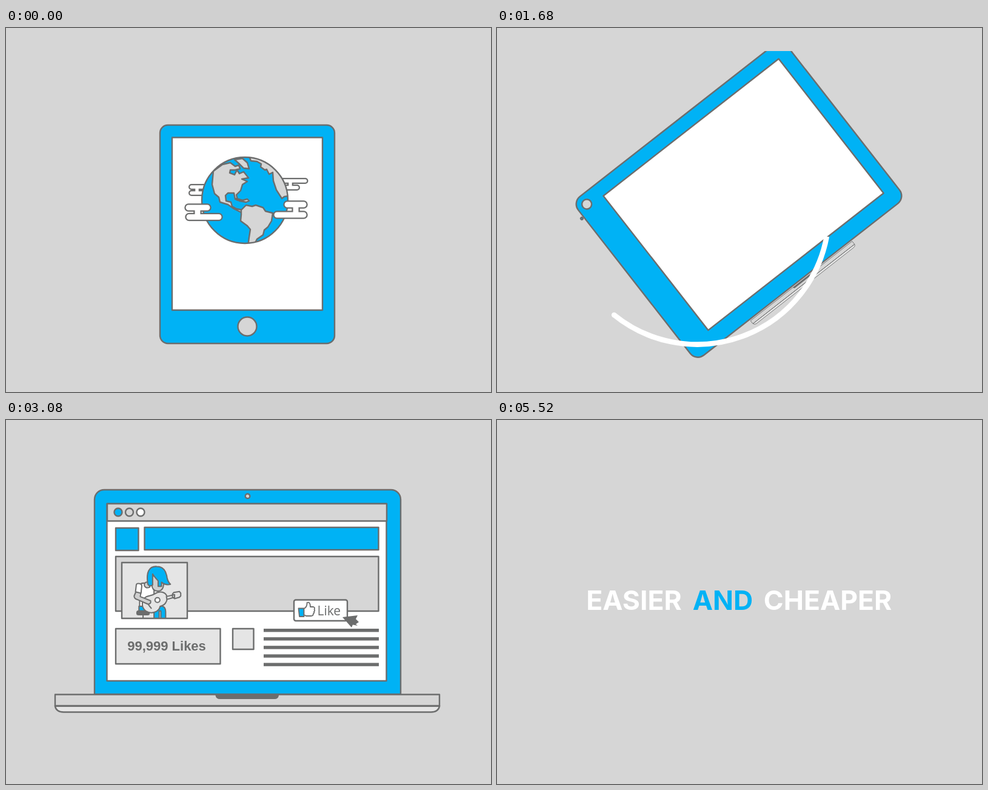
An HTML page for the animation above (5840 ms loop, 800 by 600 pixels).

```html
<!DOCTYPE html>
<html lang="en">
<head>
<meta charset="utf-8">
<title>Easier and cheaper</title>
<style>
html, body { margin: 0; width: 100%; height: 100%; overflow: hidden; background: #d6d6d6; }
svg { display: block; width: 800px; height: 600px; }
.o { stroke: #6c6d6d; stroke-width: 2.4; stroke-linejoin: round; stroke-linecap: round; }
.thin { stroke-width: 1.8; }
.n { vector-effect: non-scaling-stroke; }
.b { fill: #00b2f5; }
.w { fill: #fff; }
.l { fill: #e5e5e5; }
.g { fill: #d6d6d6; }
.s { fill: #cfcfcf; }
.d { fill: #6c6d6d; }
.x { fill: none; }
.count { font: bold 22px "Liberation Sans", Arial, sans-serif; }
.like { font: 21px "Open Sans", sans-serif; }
.word { font: 700 44.5px Inter, sans-serif; text-anchor: middle; }
</style>
</head>
<body>
<svg viewBox="0 0 800 600">
<defs>
  <clipPath id="stageClip"><rect y="38" width="800" height="562"/></clipPath>
  <clipPath id="screenClip"><rect x="285" y="160" width="225" height="259"/></clipPath>
  <clipPath id="globeClip"><circle cx="394" cy="284" r="71"/></clipPath>
  <clipPath id="photoClip"><rect x="191" y="235" width="108" height="92"/></clipPath>
  <clipPath id="wordClip"><rect y="276" width="800" height="43"/></clipPath>

  <path id="pair" d="M-11 -18L22.500 -23.500V9A9 9 0 1 1 15.500 .5V-13L-4.500 -9V14A9.200 9.200 0 1 1 -11 5.500Z"/>
  <path id="single" d="M2 -14L6.500 -15V9A6.300 6.300 0 1 1 2 2.800Z"/>

  <g id="player" class="o thin">
    <path class="w" d="M357 207Q360 203 366 205H378V244H357Z"/>
    <path class="b" d="M356 238H366V245H356Z"/>
    <rect class="d" x="353" y="245" width="18" height="5.500" rx="2.500"/>
    <path class="x" d="M362 251V273M357 274Q362 266 367 274"/>
    <path class="b" d="M378 271V246Q378 238 386 238H390Q395 239 395 246V271H388V245H385.500V271Z"/>
    <path class="x" d="M378 266H385M388 266H395"/>
    <path class="d" d="M378 271H395L398 274H378Z"/>
    <path class="s" d="M375 194H392V207Q391 216 383 216Q375 215 375 207Z"/>
    <path class="s" d="M370 203Q363 202 364 208Q366 213 372 210Z"/>
    <path class="b" d="M369 206C366 188 371 179.500 382 180C393 180 396 189 397 196Q398 202 402 206Q395 208 389 203V209H384V201Q379 196 376 191V207Q371 210 369 206Z"/>
    <path class="l" d="M362 229C365 222 373 224 379 220C386 215 395 217 397 224C398 232 393 237 387 238C385 247 374 250 366 245C361 241 360 235 362 229Z"/>
    <path class="l" d="M396 224L408 221V225L397 228ZM405 220L407 218L415 216.500L417 219V223L415 225L408 227L405 225Z"/>
    <circle class="w" cx="383" cy="229" r="3.600"/>
    <path class="x" d="M370 236L374 241"/>
    <path class="s" d="M352 216L349 223Q349 227 353 228L369 235Q374 235 373 230L358 224L359 217Z"/>
    <path class="w" d="M352 208Q352 204 357 205Q361 206 360 210L359 219L351 217Z"/>
  </g>
</defs>

<g clip-path="url(#stageClip)">
  <g id="notes"></g>
  <g id="laptop">
    <g id="fold">
      <g id="lid">
        <path id="shell" class="o b"/>
        <rect id="screen" class="o w"/>
        <circle id="button" class="o g"/>
        <circle id="speck" class="o b" cx="-223" cy="-135.500" r="1.800" stroke-width="1"/>
      </g>
      <g id="web">
        <g id="bar">
          <rect class="o g" x="167" y="138" width="461" height="28.500"/>
          <circle class="o b" cx="185" cy="152" r="6.500"/>
          <circle class="o g" cx="203.500" cy="152" r="6.500"/>
          <circle class="o w" cx="222" cy="152" r="6.500"/>
        </g>
        <rect id="tile" class="o b" x="181" y="178" width="37.500" height="37"/>
        <rect id="banner" class="o b" x="228.500" y="177" width="386" height="37"/>
        <rect id="cover" class="o g" x="181" y="225" width="433.500" height="90"/>
        <g id="photo">
          <rect class="l" x="191" y="235" width="108" height="92"/>
          <g clip-path="url(#photoClip)"><use href="#player" transform="translate(-183 38) scale(1.130)"/></g>
          <rect class="o x" x="191" y="235" width="108" height="92"/>
        </g>
        <g id="like">
          <rect id="likeBox" class="o" x="475" y="296.500" width="88" height="34.500" rx="3"/>
          <path class="o b thin" d="M482.500 310.500H491.500V324H484Z"/>
          <path class="o w thin" d="M491.500 311Q497 308 496.500 301Q502 299 502 308H507Q510 309 508.500 312Q510 314 508 316Q509 318 507 319Q507 323 503 323H495L491.500 321Z"/>
          <text class="like d" x="513.500" y="321.500">Like</text>
        </g>
        <rect id="countBox" class="o l" x="181" y="344" width="172.500" height="58"/>
        <g id="count"></g>
        <rect id="square" class="o l" x="374" y="344" width="34.500" height="34"/>
        <g id="lines"></g>
        <path id="cursor" class="d" d="M555 325L580 322L577 328L582 333L577 336.500L580 339L572 337.500L570 342Z"/>
      </g>
    </g>
    <g id="base">
      <g id="deck">
        <path id="strip" class="o l" d="M81 452Q81 443 93 443H703Q715 443 715 452Z"/>
        <path class="o l" d="M81 471V472Q83 481.500 95 481.500H701Q713 481.500 715 472V471Z"/>
        <rect class="o g" x="81" y="452.500" width="634" height="18.500"/>
        <path class="o x" stroke-width="3" d="M81 471.500H715"/>
        <path class="d" d="M345.500 452H450V454Q449 460 443 460H353Q346.500 460 345.500 454Z"/>
      </g>
    </g>
  </g>

  <g id="pages"><g clip-path="url(#screenClip)">
    <g id="world"><g transform="translate(397.500 305) scale(.9167) translate(-398 -340)">
      <g id="far"></g>
      <circle class="b" cx="394" cy="284" r="71"/>
      <g class="o g" clip-path="url(#globeClip)">
        <path d="M342 236L357 225L370 222L378 228L384 226L386 232L378 234L370 234L369 239L377 242L381 234L385 240L392 237L400 247L389 249L398 253L390 258L387 268L380 275L382 284L378 282L376 272L366 272L362 276L363 285L371 287L373 294L380 298L390 300L388 304L376 298L366 291L353 287L351 279L344 273L340 258Z"/>
        <path d="M377 217L390 215L398 222L401 232L392 231L385 224Z"/>
        <path d="M402 214L404 219L414 220L421 224L420 229L427 234L430 233L434 241L440 238L441 252L446 267L455 281L459 278L475 275L465 225L430 205Z"/>
        <path d="M388 300L396 292L406 294L412 292L424 296L428 302L440 305L438 318L432 328L426 333L424 341L414 348L408 360H399L401 345L403 332L398 326L387 318L388 308Z"/>
        <path d="M380 281L390 284L398 282L401 285L396 287L385 285Z"/>
      </g>
      <circle class="o x" cx="394" cy="284" r="71"/>
      <g id="near"></g>
    </g></g>
    <g id="panels">
      <rect class="o l" x="292" y="169" width="211" height="116"/>
      <rect class="o l" x="292" y="294" width="211" height="116"/>
      <path class="o" stroke-width="3" d="M343 274.500H413M423 274.500H452"/>
      <use href="#player"/>
      <g class="o thin">
        <path class="x" d="M443 199C450 202 449 215 448 235S444 262 446 271"/>
        <path class="w" d="M436 204H438.500V272H446V274H428V272H436Z"/>
        <path class="b" d="M427 200L441 197.500Q444 200 442 203L428 207Z"/>
        <circle class="l" cx="427" cy="203.800" r="3.700"/>
      </g>
      <use href="#pair" class="o b" x="397.500" y="344"/>
      <path class="o w" d="M337 380L353 389L337 398Z"/>
      <path class="d" d="M358 387H458V391H358Z"/>
      <circle id="knob" class="o w" cy="389.300" r="6.200"/>
    </g>
  </g></g>

  <g id="hand" class="o">
    <path class="l" d="M247 640V600C249 575 243 558 237 546C229 528 228 515 226 507L215 463C214 449 236 447 241 456L239 446C238 430 262 428 266 438L265 430C264 416 287 413 292 424L274 364C271 347 297 343 302 356L328 444C331 432 339 421 350.500 416.500L366 472C372 500 370 545 336 573L334 600V640Z"/>
    <path class="x" d="M241 456L252 500M266 438L280 485M292 424L306 470M327 443L339 488"/>
  </g>

  <path id="arc" class="x" stroke="#fff" stroke-width="8.600"/>
  <circle id="arcHead" class="w" r="4.300"/>

  <g id="words" clip-path="url(#wordClip)">
    <text class="word w" x="226" y="313">EASIER</text>
    <text class="word b" x="372.500" y="313">AND</text>
    <text class="word w" x="545.500" y="313">CHEAPER</text>
  </g>
</g>
</svg>

<script>
const LOOP = 5840, STEP = 40;
const el = {};
document.querySelectorAll("[id]").forEach(e => el[e.id] = e);

const clamp = p => Math.min(1, Math.max(0, p));
const mix = (a, b, p) => a + (b - a) * p;
const linear = p => p;
const smooth = p => p * p * (3 - 2 * p);
const out = p => 1 - (1 - p) ** 3;
const back = p => p <= 0 ? 0 : 1 + 2.70158 * (p - 1) ** 3 + 1.70158 * (p - 1) ** 2;
const run = (t, start, length, ease = out) => ease(clamp((t - start) / length));

// Interpolates a flat list of time, value pairs.
function key(t, k, ease = smooth) {
  if (t <= k[0]) return k[1];
  for (let i = 2; i < k.length; i += 2)
    if (t < k[i]) return mix(k[i - 1], k[i + 1], ease((t - k[i - 2]) / (k[i] - k[i - 2])));
  return k[k.length - 1];
}

const about = (x, y, sx, sy = sx) => `translate(${x} ${y}) scale(${sx} ${sy}) translate(${-x} ${-y})`;
const move = (e, tf) => e.setAttribute("transform", tf);
const show = (e, on) => e.style.display = on ? "" : "none";
const attrs = (e, o) => Object.keys(o).forEach(k => e.setAttribute(k, o[k]));

const cloud = (d, w) =>
  `<g fill="none" stroke-linecap="round"><path d="${d}" stroke="#6c6d6d" stroke-width="${w}"/>` +
  `<path d="${d}" stroke="#fff" stroke-width="${w - 4.6}"/></g>`;
el.far.innerHTML = cloud("M306 262H330M306 272H330M315 262V272", 10) +
  cloud("M456 252H493.500M462 263H480M469 252V263", 10);
el.near.innerHTML = cloud("M301 296H332M302 311.500H351M316 296V311", 13.500) +
  cloud("M464 291H491M447 308H491M478 291V308", 13.500);

const lineStart = [1740, 1740, 1740, 1887, 1821];
el.lines.innerHTML = lineStart.map((s, i) =>
  `<rect class="d" x="425" y="${344 + i * 14.1}" width="190" height="5.400"/>`).join("");

const noteList = [
  ["pair", 67.5, 400, "b"], ["pair", 56, 432.5, "l"], ["single", 68.5, 464.5, "w"],
  ["pair", 734, 400, "b"], ["pair", 738, 438.5, "l"], ["single", 743, 466.5, "w"]
];
el.notes.innerHTML = noteList.map(([shape, , , fill]) => `<use href="#${shape}" class="o n ${fill}"/>`).join("");
document.querySelectorAll("#pair, #single").forEach(e => e.classList.add("n"));

// centre x, y, width, height, bezels left, right, top, bottom, radius top, bottom
const shapes = [
  [398, 340, 360, 288, 55, 20.5, 20, 20, 13, 13],
  [397.5, 305, 330, 264, 50, 19, 18.5, 18.5, 12, 12],
  [399, 283.5, 438, 332, 47, 24, 23, 28, 16, 16],
  [398.5, 283.5, 505, 337, 20.5, 23.5, 23, 22, 16, 0]
];

function shapeAt(t) {
  const s = key(t, [160, 0, 560, 1, 1320, 1, 1680, 2, 1880, 3]);
  const i = Math.min(2, Math.floor(s));
  return shapes[i].map((v, j) => mix(v, shapes[i + 1][j], s - i));
}

function drawDevice(t) {
  const [cx, cy, w, h, l, r, tp, b, R, B] = shapeAt(t);
  const turn = key(t, [1320, -90, 1440, -84, 1560, -66, 1680, -38, 1760, -19, 1840, -5, 1920, 1.5, 2000, 0], linear);
  const x = w / 2, y = h / 2;
  const place = `translate(${cx} ${cy}) rotate(${turn})`;
  move(el.lid, place);
  el.shell.setAttribute("d", `M${-x} ${y - B}V${R - y}A${R} ${R} 0 0 1 ${R - x} ${-y}H${x - R}` +
    `A${R} ${R} 0 0 1 ${x} ${R - y}V${y - B}A${B} ${B} 0 0 1 ${x - B} ${y}H${B - x}A${B} ${B} 0 0 1 ${-x} ${y - B}Z`);
  attrs(el.screen, { x: l - x, y: tp - y, width: w - l - r, height: h - tp - b });
  attrs(el.button, {
    cx: key(t, [160, -152, 560, -139, 1320, -139, 1680, -202, 1840, 0]),
    cy: key(t, [1320, 0, 1680, -149, 1840, -158]),
    r: key(t, [160, 15.5, 560, 14.3, 1320, 14.3, 1680, 8, 1840, 3.8])
  });
  show(el.speck, t >= 1640 && t < 1760);

  const drop = key(t, [3700, 0, 3900, 18, 4000, 14.5]);
  const shut = run(t, 3640, 240, p => p * p);
  move(el.fold, `translate(397.5 ${452 + drop}) scale(${mix(1, 1.257, shut)} ${mix(1, .02, shut)}) translate(-397.5 -452)`);
  show(el.fold, t < 3880);
  show(el.strip, t >= 3880);
  move(el.strip, "translate(0 .5)");
  move(el.web, `${place} scale(${w / 505}) translate(-398.5 -283.5)`);
  show(el.web, t > 1720);

  const grow = key(t, [1560, 0, 1680, .335, 1840, .8, 1960, 1.06, 2040, 1.022, 2160, .99, 2320, 1.006, 2480, 1], linear);
  move(el.base, `${place} translate(-398.5 -283.5)`);
  move(el.deck, `translate(0 ${drop}) ${about(397.5, 452, grow)}`);
  show(el.deck, grow > 0);

  const slide = key(t, [4600, 0, 4680, 40, 4760, 60, 4800, 52, 4840, 24, 4880, -40, 4960, -260, 5080, -740], linear);
  move(el.laptop, `translate(${slide} 0) ${about(0, 467, 1, key(t, [4680, 1, 4800, .9]))}`);
  show(el.laptop, t < 5080);

  move(el.pages, `translate(${cx} ${cy}) scale(${h / 264}) translate(-397.5 -305)`);
  show(el.pages, t < 1320);
}

function drawPages(t) {
  const swipe = run(t, 660, 180, smooth);
  move(el.world, `translate(${-227 * swipe} 0)`);
  move(el.panels, `translate(${227 * (1 - swipe)} 0) ${about(397.5, 290, key(t, [1220, 1, 1320, 0]))}`);
  move(el.far, `translate(${3 * Math.sin(t / 180)} 0)`);
  move(el.near, `translate(${-4 * Math.sin(t / 220)} 0)`);
  el.knob.setAttribute("cx", 395.5 + (t - 880) * .05);

  const dx = key(t, [640, 130, 860, 0, 960, -6, 1120, 0]);
  const dy = key(t, [440, 260, 640, 0, 1140, 0, 1360, 260]);
  move(el.hand, `translate(${dx} ${dy})`);
  show(el.hand, t > 440 && t < 1360);
}

function drawArc(t) {
  const on = t > 1480 && t < 1840;
  show(el.arc, on);
  show(el.arcHead, on);
  if (!on) return;
  const point = deg => [330 + 217.5 * Math.cos(deg * Math.PI / 180), 304 + 217.5 * Math.sin(deg * Math.PI / 180)];
  const head = key(t, [1480, 11, 1680, 129, 1820, 215], linear);
  const tail = key(t, [1680, 10.5, 1840, 212], linear);
  const [hx, hy] = point(head);
  el.arc.setAttribute("d", `M${point(tail)}A217.5 217.5 0 ${head - tail > 180 ? 1 : 0} 1 ${hx} ${hy}`);
  attrs(el.arcHead, { cx: hx, cy: hy });
}

const advance = { ",": .278, " ": .278, i: .278, L: .611 };

function drawCount(t) {
  const full = t >= 3240;
  const chars = [...(full ? "100,000 Likes" : "99,999 Likes")];
  const widths = chars.map(c => 22 * (advance[c] || .556));
  let x = 265 - widths.reduce((a, b) => a + b) / 2;
  el.count.innerHTML = chars.map((c, i) => {
    const s = full ? (i > 6 ? 1 : run(t, 3160 + i * 15, 240, back)) : run(t, 1905 + i * 60, 240, back);
    const text = `<text class="count d" x="${x}" y="380" transform="${about(x + widths[i] / 2, 372, s)}">${c}</text>`;
    x += widths[i];
    return text;
  }).join("");
}

function drawWeb(t) {
  move(el.bar, about(397.5, 138, 1, run(t, 1740, 120)));
  move(el.tile, about(199.7, 196.5, run(t, 1866, 300, back)));
  move(el.banner, about(228.5, 196, run(t, 1903, 300), 1));
  move(el.cover, about(181, 270, run(t, 1760, 200), 1));
  move(el.photo, about(245.5, 281, run(t, 1893, 300, back)));
  const press = key(t, [3120, 1, 3200, .93, 3280, 1.04, 3360, 1]);
  move(el.like, about(519, 313.7, run(t, 1905, 300, back) * press));
  el.likeBox.setAttribute("fill", t < 2960 ? "#e5e5e5" : "#fff");
  move(el.countBox, about(267.3, 373, run(t, 1944, 300, back), 1));
  move(el.square, about(391.2, 361, run(t, 1962, 300, back)));
  [...el.lines.children].forEach((line, i) => line.setAttribute("width", 190 * run(t, lineStart[i], 300)));
  drawCount(t);

  const far = 1 - run(t, 2600, 360, smooth);
  const size = key(t, [2560, 0, 2640, 1, 3120, 1, 3200, .85, 3280, 1, 3480, 1, 3600, 0]);
  move(el.cursor, `translate(${110 * far} ${110 * far}) ${about(555, 325, size)}`);
}

function drawNotes(t) {
  show(el.notes, t > 3840 && t < 4600);
  const rise = run(t, 3840, 200);
  const size = rise * key(t, [4400, 1, 4600, 0]);
  const sway = t > 4040 ? 1 - Math.cos((t - 4040) / 75) : 0;
  noteList.forEach(([shape, x, y], i) => {
    const side = i < 3 ? -1 : 1;
    const px = mix(398 + side * 300, x, rise) + side * 3 * sway;
    const py = mix(476, y, rise) + sway;
    const k = size * (shape === "pair" ? .66 : 1);
    move(el.notes.children[i], `translate(${px} ${py}) rotate(${side * 3 * sway}) scale(${k})`);
  });
}

function drawWords(t) {
  [...el.words.children].forEach((word, i) => {
    move(word, `translate(0 ${42 * (1 - run(t, 5090 + i * 140, 150))})`);
  });
  show(el.words, t > 5080);
}

function draw(now) {
  const t = Math.floor(now % LOOP / STEP) * STEP;
  drawDevice(t);
  drawPages(t);
  drawArc(t);
  drawWeb(t);
  drawNotes(t);
  drawWords(t);
}

const begin = performance.now();
function frame() {
  draw(performance.now() - begin);
  requestAnimationFrame(frame);
}
frame();
</script>
</body>
</html>
```
